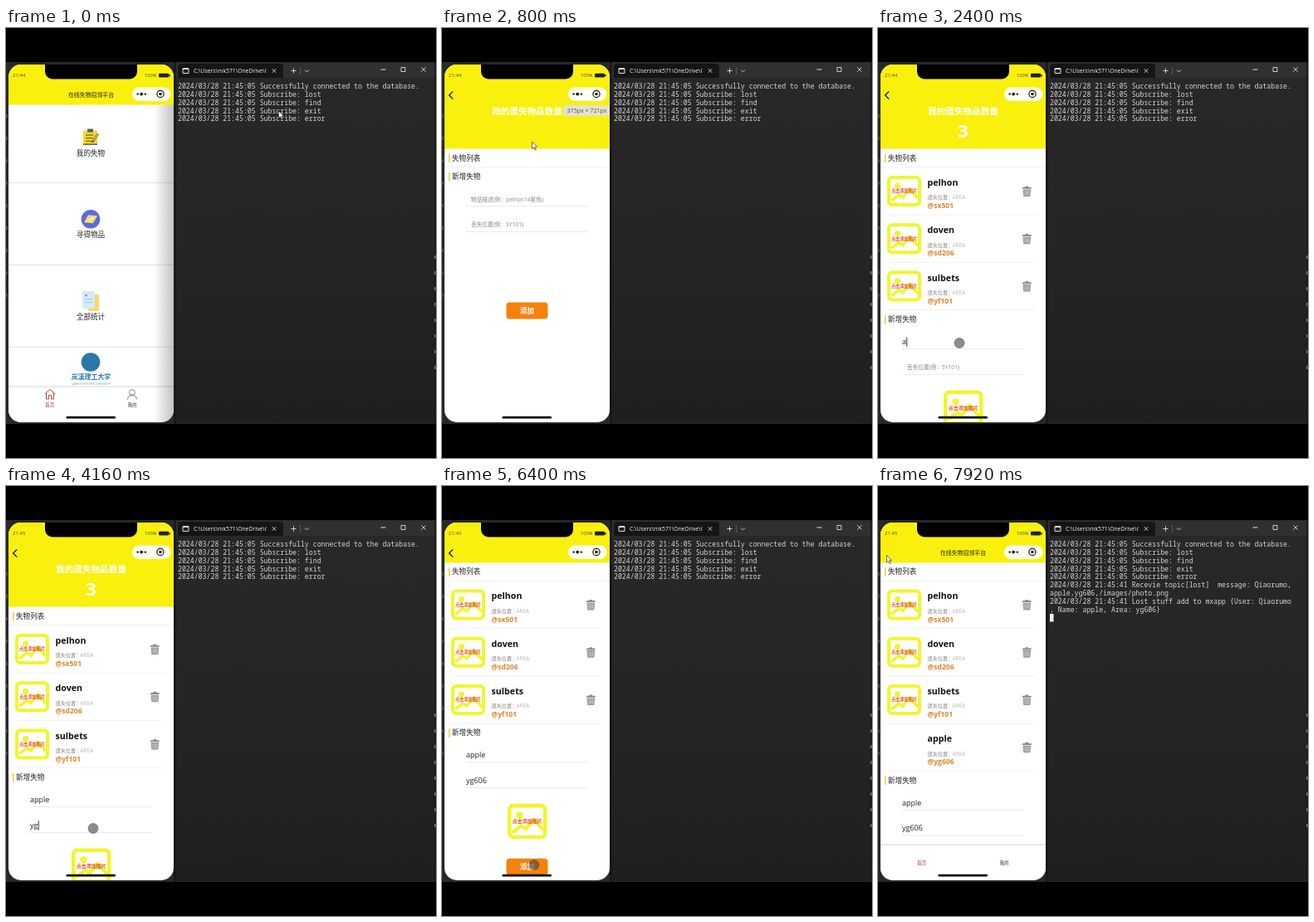
An HTML page with a canvas that plays this animation: 518x518 px, repeating every 8 s.

```html
<!DOCTYPE html>
<html lang="zh-CN">
<head>
<meta charset="utf-8">
<title>Lost and found demo</title>
<style>
html, body { margin: 0; width: 100%; height: 100%; overflow: hidden; background: #000; }
canvas { display: block; width: 518px; height: 518px; }
</style>
</head>
<body>
<canvas id="stage"></canvas>
<script>
const SIZE = 518, LOOP = 8000, STEP = 80;
const UI = '"Open Sans", "Noto Sans CJK SC", "Noto Sans CJK", sans-serif';
const MONO = '"Noto Sans Mono", "DejaVu Sans Mono", monospace';
const YELLOW = '#faf00e', LIME = '#f1f52e', ORANGE = '#f5820c';
const PHONE = { x: 3, y: 44, w: 199, h: 431 };
const ROW = 57.3;

const canvas = document.getElementById('stage');
const scale = window.devicePixelRatio || 1;
canvas.width = canvas.height = SIZE * scale;
const c = canvas.getContext('2d');

const clamp = v => Math.min(1, Math.max(0, v));
const ease = v => v * v * (3 - 2 * v);
const span = (t, a, b) => ease(clamp((t - a) / (b - a)));

function rect(x, y, w, h, color) {
  c.fillStyle = color;
  c.fillRect(x, y, w, h);
}
function round(x, y, w, h, r, color) {
  c.beginPath();
  c.roundRect(x, y, w, h, r);
  c.fillStyle = color;
  c.fill();
}
function disc(x, y, r, color) {
  c.beginPath();
  c.arc(x, y, r, 0, Math.PI * 2);
  c.fillStyle = color;
  c.fill();
}
function trace(points, closed) {
  c.beginPath();
  points.forEach(([x, y]) => c.lineTo(x, y));
  if (closed) c.closePath();
}
function shape(points, color) {
  trace(points, true);
  c.fillStyle = color;
  c.fill();
}
function line(points, color, width = 1, closed = false) {
  trace(points, closed);
  c.strokeStyle = color;
  c.lineWidth = width;
  c.stroke();
}
// y is the visual middle of capitals and Chinese characters
function text(s, x, y, size, color, { weight = 400, align = 'left', font = UI } = {}) {
  c.font = `${weight} ${size}px ${font}`;
  c.textAlign = align;
  c.fillStyle = color;
  c.fillText(s, x, y + size * 0.37);
  return c.measureText(s).width;
}
const centered = { align: 'center' };
const bold = { weight: 700 };
const boldCentered = { weight: 700, align: 'center' };

// Typing: [time, text] pairs
function typed(t, keys) {
  return keys.reduce((now, [at, s]) => t >= at ? s : now, '');
}
const ITEM_KEYS = [[2160, 'a'], [2560, 'ap'], [2640, 'app'], [2800, 'appl'], [2880, 'apple']];
const AREA_KEYS = [[4000, 'y'], [4160, 'yg'], [5120, 'yg6'], [5280, 'yg60'], [5360, 'yg606']];
const ITEMS = [['pelhon', 'sx501'], ['doven', 'sd206'], ['sulbets', 'yf101'], ['apple', 'yg606']];

// ---------- terminal ----------
const LOG = ['05 Successfully connected to the database.', '05 Subscribe: lost',
  '05 Subscribe: find', '05 Subscribe: exit', '05 Subscribe: error'];
const REPLY = ['2024/03/28 21:45:41 Recevie topic[lost]  message: Qiaorumo,',
  'apple,yg606,/images/photo.png',
  '2024/03/28 21:45:41 Lost stuff add to mxapp {User: Qiaorumo',
  ', Name: apple, Area: yg606}'];

function terminal(t) {
  rect(0, 41, SIZE, 436, '#282828');
  rect(202, 41, 3, 436, '#191919');
  const body = c.createLinearGradient(0, 59, 0, 476);
  body.addColorStop(0, '#282828');
  body.addColorStop(0.5, '#252525');
  body.addColorStop(1, '#1f1f1f');
  rect(205, 59, 311, 417, body);
  rect(205, 42, 311, 18, '#303030');
  round(207, 43, 127, 17, [4, 4, 0, 0], '#151515');
  rect(516, 41, 2, 436, '#1b1b1b');
  for (let y = 274; y < 415; y += 19) rect(516, y, 1.5, 4, '#777');
  for (let y = 104; y < 330; y += 27) rect(0.5, y, 1, 4, y > 280 ? '#3d6f9a' : '#77713c');

  round(212.5, 48, 8, 7, 1.5, '#ddd');
  rect(213.5, 50, 6, 4, '#222');
  c.save();
  c.beginPath();
  c.rect(224, 43, 89.5, 17);
  c.clip();
  text('C:\\Users\\mk571\\OneDrive\\Code', 226, 51.5, 6.8, '#f2f2f2');
  c.restore();
  const cross = (x, y, r) => {
    line([[x - r, y - r], [x + r, y + r]], '#ddd', 0.9);
    line([[x - r, y + r], [x + r, y - r]], '#ddd', 0.9);
  };
  cross(323, 51.5, 2.3);
  line([[343.5, 51.5], [349.5, 51.5]], '#ddd', 0.9);
  line([[346.5, 48.5], [346.5, 54.5]], '#ddd', 0.9);
  rect(354, 47, 0.8, 9, '#666');
  line([[360, 50.5], [362.5, 53], [365, 50.5]], '#ccc', 0.9);
  rect(451.5, 49.5, 6, 1, '#ddd');
  line([[476, 47.5], [481, 47.5], [481, 52.5], [476, 52.5]], '#ddd', 0.9, true);
  cross(503, 50, 2.6);

  const lines = LOG.map(s => '2024/03/28 21:45:' + s);
  if (t >= 6720) lines.push(...REPLY);
  lines.forEach((s, i) => text(s, 207, 69.9 + i * 9.88, 8.22, '#d4d4d4', { font: MONO }));
  if (t >= 6720) rect(207, 154, 4.5, 9.5, '#f2f2f2');
}

// ---------- phone parts ----------
function picture(x, y, w, h, labelSize) {
  const k = w / 41;
  c.beginPath();
  c.roundRect(x + 2 * k, y + 2 * k, w - 4 * k, h - 4 * k, 4 * k);
  c.strokeStyle = LIME;
  c.lineWidth = 4 * k;
  c.stroke();
  const at = points => points.map(([a, b]) => [x + a * k, y + b * k]);
  disc(x + 12.5 * k, y + 12 * k, 3.6 * k, LIME);
  line(at([[5, 30], [14, 23], [19, 26], [27, 16], [37, 27]]), LIME, 3.6 * k);
  text('点击添加图片', x + w / 2, y + h / 2, labelSize, '#e0532b', boldCentered);
}
function trash(x, y) {
  round(x - 2, y - 6.5, 4, 2, 1, '#8c8c8c');
  round(x - 5.5, y - 5.3, 11, 2, 0.8, '#8c8c8c');
  shape([[x - 4.7, y - 2.6], [x + 4.7, y - 2.6], [x + 4, y + 6], [x - 4, y + 6]], '#999');
  for (const dx of [-2.2, 0, 2.2]) rect(x + dx - 0.4, y - 1.4, 0.8, 6, '#dedede');
}
function heading(s, y) {
  rect(8, y - 5, 1.5, 10.5, '#f3c83a');
  text(s, 12, y, 8.6, '#222');
}
function field(y, hint, value, caret) {
  if (value) text(value, 29, y - 0.5, 9, '#222');
  else text(hint, 35, y, 6.7, '#858585');
  if (caret) {
    c.font = `400 9px ${UI}`;
    rect(29.3 + c.measureText(value).width, y - 5.5, 0.9, 11, '#222');
  }
  rect(29, y + 8, 147, 0.8, '#e4e4e4');
}
function listPage(t) {
  const loaded = t >= 960;
  const count = t >= 6880 ? 4 : loaded ? 3 : 0;
  const scroll = 53.6 * span(t, 5680, 6160);
  c.save();
  c.translate(0, -scroll);
  rect(3, 44, 199, 520, '#fff');
  rect(3, 44, 199, 101.5, YELLOW);
  text('我的遗失物品数量', 102.5, 100, 10.6, '#fff', boldCentered);
  if (loaded) text(count, 102.5, 124, 22, '#fff', boldCentered);
  heading('失物列表', 156.8);
  rect(3, 167.5, 199, 0.7, '#eaeaea');
  ITEMS.slice(0, count).forEach(([name, area], i) => {
    const y = 168 + i * ROW;
    if (i < 3) picture(11, y + 10, 41, 37, 5.2);
    text(name, 59.5, y + 18, 10.7, '#111', bold);
    const w = text('遗失位置', 59.5, y + 36, 6.2, '#8a8a8a');
    text('| AREA', 59.5 + w, y + 36, 6.4, '#b9b9b9');
    text('@' + area, 59.5, y + 46, 8.6, '#de8630', bold);
    trash(179.3, y + 29);
    rect(10, y + ROW - 0.5, 180, 0.7, '#ececec');
  });
  const y = 179 + count * ROW;
  heading('新增失物', y);
  const itemCaret = t >= 1840 && t < 3600;
  const areaCaret = t >= 3600 && t < 5360;
  field(y + 27.3, '物品描述(例：pelhon14紫色)', typed(t, ITEM_KEYS), itemCaret);
  field(y + 58, '丢失位置(例：SY101)', typed(t, AREA_KEYS), areaCaret);
  if (loaded) picture(79, y + 85.5, 47.5, 42.5, 6);
  round(77.5, y + 151.5, 50, 20, 4, ORANGE);
  text('添加', 102.5, y + 161.7, 8.6, '#fff', boldCentered);
  c.restore();
}

function noteIcon(x, y) {
  round(x - 9, y - 8, 17, 17, 1.5, '#f6d62f');
  round(x - 4, y - 10, 7, 4, 1, '#5a5a5a');
  for (let i = 0; i < 3; i++) rect(x - 6, y - 3 + i * 3.6, 9, 1, '#5b5320');
  rect(x - 9, y + 8, 17, 1.3, '#4c4c4c');
  line([[x + 9, y - 4], [x + 2, y + 6]], '#484848', 2.4);
  line([[x + 9, y - 4], [x + 3, y + 4.5]], '#f8ee5c', 1.2);
}
function foundIcon(x, y) {
  disc(x, y, 11.3, '#5c68e2');
  shape([[x - 3, y - 5], [x + 8, y - 4], [x + 3, y + 5], [x - 8, y + 4]], '#f8dc62');
  line([[x - 2, y + 2], [x + 3, y - 2]], '#fff', 1.6);
}
function statsIcon(x, y) {
  round(x - 3, y - 8, 13, 20, 2, '#f8d968');
  round(x - 10, y - 12, 15, 21, 2, '#d5e9f8');
  rect(x - 7, y - 8, 3, 2, '#6ca9df');
  rect(x - 7, y - 3, 9, 1, '#a4cbe9');
  rect(x - 7, y + 1, 9, 1, '#a4cbe9');
}
function tabBar(icons) {
  rect(3, 432, 199, 43, '#fff');
  rect(3, 431.5, 199, 1, '#d6d6d6');
  text('首页', 52.7, 453.5, 5.6, '#a3392d', centered);
  text('我的', 152, 453.5, 5.6, '#333', centered);
  if (!icons) return;
  line([[46.5, 441], [53, 435.5], [59.5, 441]], '#a4503f', 1);
  line([[48.5, 440], [48.5, 447], [51.5, 447], [51.5, 442.5], [54.5, 442.5],
    [54.5, 447], [57.5, 447], [57.5, 440]], '#a4503f', 1);
  c.strokeStyle = '#777';
  c.lineWidth = 0.9;
  c.beginPath();
  c.arc(152, 439, 3.4, 0, Math.PI * 2);
  c.moveTo(146.5, 447.5);
  c.arc(152, 447.5, 5.5, Math.PI, 0);
  c.stroke();
}
function homePage() {
  rect(3, 44, 199, 431, '#fff');
  [[noteIcon, '我的失物'], [foundIcon, '寻得物品'], [statsIcon, '全部统计']].forEach(([icon, label], i) => {
    const y = 131.5 + i * 98.8;
    icon(102, y);
    text(label, 102, y + 19, 8.6, '#222', centered);
    rect(3, y + 54.7, 199, 0.8, '#dedede');
  });
  disc(102, 402.5, 11.3, '#2878a8');
  text('岚溪理工大学', 102.5, 420.5, 7.9, '#2878a8', boldCentered);
  text('LANXI POLYTECHNIC UNIVERSITY', 102.5, 428.5, 3, '#5a95b8', centered);
  tabBar(true);
}

function navBar(t, home) {
  rect(3, 44, 199, 48.5, YELLOW);
  round(47, 40, 111, 21.5, [0, 0, 9, 9], '#000');
  text(t >= 3200 ? '21:45' : '21:44', 8, 57, 6, '#55510f');
  text('100%', 167, 57.2, 5.7, '#55510f');
  round(184, 54.8, 12, 4.8, 1, '#222');
  rect(196.3, 56, 1.4, 2.4, '#222');
  if (home) text('在线失物招领平台', 102.5, 80.3, 6.9, '#222', centered);
  else line([[13.2, 76.4], [8.6, 81], [13.2, 85.6]], '#111', 1.3);
  round(152, 71.5, 46.5, 16.5, 8.2, '#fffef2');
  disc(158.6, 79.6, 1.2, '#111');
  disc(163.2, 79.6, 1.9, '#111');
  disc(167.8, 79.6, 1.2, '#111');
  c.beginPath();
  c.arc(186, 79.5, 4.1, 0, Math.PI * 2);
  c.strokeStyle = '#111';
  c.lineWidth = 1.2;
  c.stroke();
  disc(186, 79.5, 1.8, '#111');
}

function phone(t) {
  const { x, y, w, h } = PHONE, right = x + w;
  const slide = span(t, 480, 720);
  const leaving = t >= 7920;
  c.save();
  c.beginPath();
  c.roundRect(x, y, w, h, 15);
  c.clip();
  if (slide < 1) {
    const edge = right - w * slide;
    homePage();
    const shade = c.createLinearGradient(edge - 24, 0, edge, 0);
    shade.addColorStop(0, 'rgba(0,0,0,0)');
    shade.addColorStop(1, 'rgba(0,0,0,0.24)');
    rect(edge - 24, 92, 24, 383, shade);
    c.save();
    c.translate(edge - x, 0);
    if (slide > 0) listPage(t);
    c.restore();
  } else {
    listPage(t);
  }
  navBar(t, slide === 0 || leaving);
  if (leaving) tabBar(false);
  if (t >= 560 && t < 1200) {
    rect(146.5, 93, 55.5, 13, '#e3e2cf');
    text('375px × 721px', 174.5, 99.5, 7.1, '#55554a', centered);
  }
  round(72.5, 467.8, 59.5, 2.8, 1.4, '#050505');
  c.restore();
}

// ---------- pointer: [time, x, y] ----------
const PATH = [[0, 328.5, 100], [80, 328.5, 100], [480, 108.5, 137], [960, 108.5, 137],
  [1280, 94, 425], [1360, 94, 425], [1520, 98, 379.5], [3120, 98, 379.5],
  [3360, 105, 412.5], [5920, 105, 412.5], [6400, 111, 456.5], [6960, 111, 456.5],
  [7360, 129, 262], [7600, 7, 62], [7680, 10.5, 83.5], [8000, 10.5, 83.5]];

function pointer(t) {
  const i = PATH.findIndex(p => p[0] > t);
  const [t0, x0, y0] = PATH[i - 1], [t1, x1, y1] = PATH[i];
  const k = ease((t - t0) / (t1 - t0));
  const x = x0 + (x1 - x0) * k, y = y0 + (y1 - y0) * k;
  if (t >= 1680 && t < 6960) {
    disc(x, y, 6, 'rgba(70,70,70,0.62)');
    c.strokeStyle = 'rgba(80,80,80,0.5)';
    c.lineWidth = 1;
    c.stroke();
    return;
  }
  const arrow = [[0, 0], [0, 8.5], [2, 6.7], [3.4, 10], [4.8, 9.3], [3.5, 6.2], [6, 6]]
    .map(([a, b]) => [x + a, y + b]);
  shape(arrow, '#fff');
  line(arrow, '#333', 0.7, true);
}

function frame(now) {
  const t = Math.floor((now % LOOP) / STEP) * STEP;
  c.setTransform(scale, 0, 0, scale, 0, 0);
  rect(0, 0, SIZE, SIZE, '#000');
  terminal(t);
  phone(t);
  pointer(t);
  requestAnimationFrame(frame);
}
requestAnimationFrame(frame);
</script>
</body>
</html>
```
